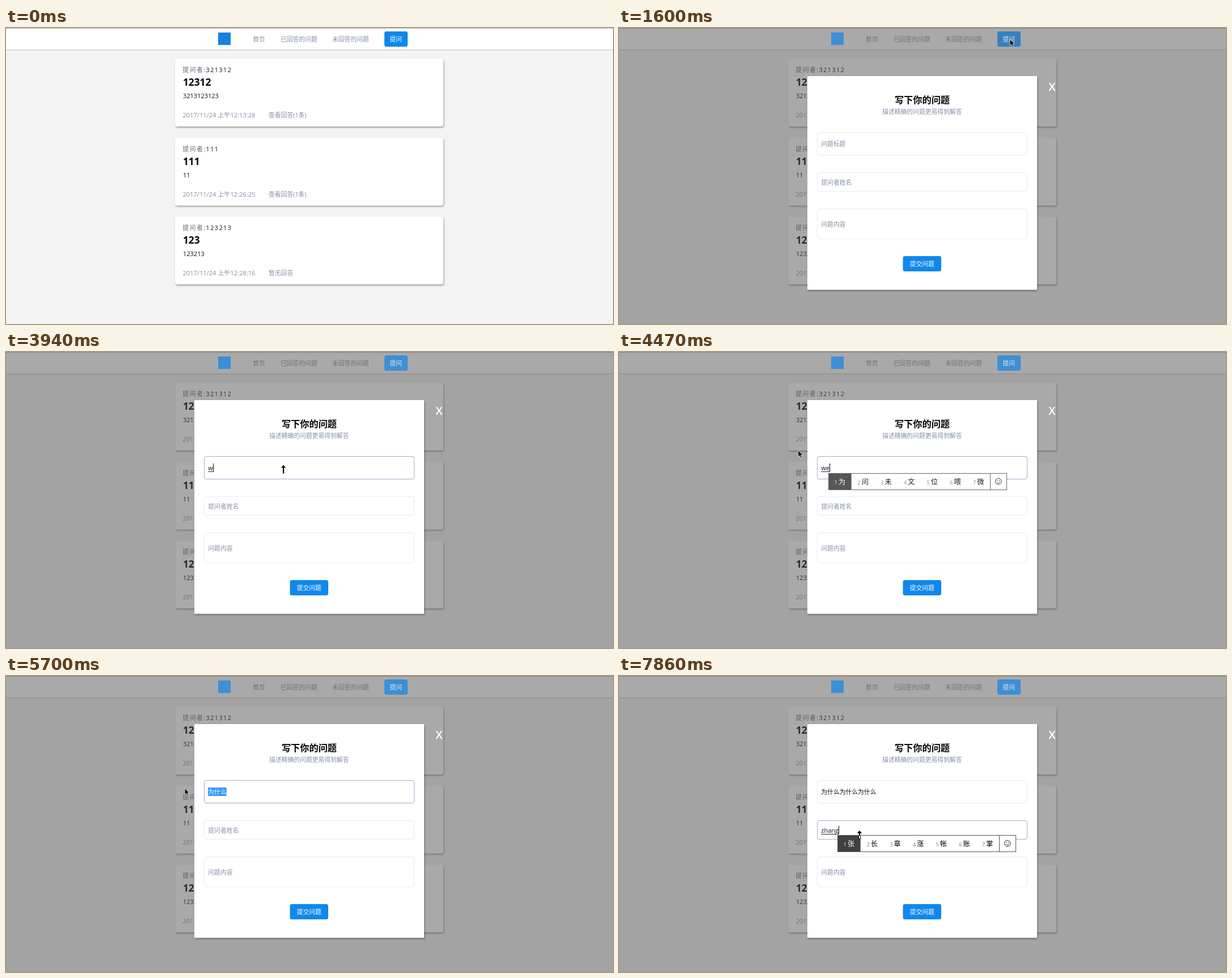
These frames come from a looping animation (1070x523 px, 8 s). An HTML page:

```html
<!DOCTYPE html>
<html lang="zh-CN">
<head>
<meta charset="utf-8">
<title>提问</title>
<style>
  html, body { margin: 0; width: 100%; height: 100%; overflow: hidden; background: #f3f3f3; }
  svg { display: block; width: 1070px; height: 523px; }
  text { font-family: "Open Sans", "Noto Sans CJK SC", "Noto Sans CJK", sans-serif; white-space: pre; }
</style>
</head>
<body>
<svg id="stage" viewBox="0 0 1070 523" xmlns="http://www.w3.org/2000/svg"></svg>
<script>
const LOOP = 8000;
const GREY = '#8590a6';
const BLUE = '#0f88eb';

// Screen refreshes: [first, last, count]; the picture rests in between.
const BURSTS = [
  [130, 360, 4], [510, 1200, 10], [1600, 2290, 10], [2440, 2440, 1], [2610, 2610, 1],
  [2840, 2840, 1], [3390, 3460, 2], [3940, 4700, 11], [4780, 5320, 8], [5470, 6090, 9],
  [6320, 7080, 11], [7160, 7400, 4], [7630, 7630, 1], [7860, 7860, 1]
];

// Pointer path: [time, x, y]
const PATH = [
  [130, 980, 472], [360, 673, 211], [510, 680, 180], [820, 718, 100], [1200, 689, 18],
  [1600, 689, 20], [1680, 687, 30], [2290, 513, 209], [3900, 513, 209], [4320, 262, 190],
  [4470, 315, 174], [4700, 420, 183], [4780, 424, 179], [5320, 428, 207], [5470, 410, 206],
  [5625, 335, 201], [5700, 316, 198.5], [5780, 288, 200], [6090, 424, 209],
  [6320, 424, 209], [6850, 424, 280.5]
];

const WHY = '为什么';
const TITLE_TEXT = [
  [0, ''], [3460, 'w'], [4470, 'we'], [4545, 'wei'], [4695, 'weis'], [4780, 'weish'],
  [4930, 'weishe'], [5010, 'weishen'], [5085, 'weishenm'], [5160, 'weishenme'],
  [5320, WHY], [6010, WHY.repeat(2)], [6320, WHY.repeat(3)]
];
const NAME_TEXT = [[0, ''], [7160, 'z'], [7318, 'zh'], [7400, 'zha'], [7630, 'zhan'], [7860, 'zhang']];

const PHRASES = '为什么 为什么呢 为什么要 为神么 为 未 位';
const CANDIDATES = {
  w: '我 为 无 问 完 万 玩',
  we: '为 问 未 文 位 喂 微',
  wei: '为 位 未 喂 微 味 围',
  weis: '卫生 为 位 未 喂 微 味',
  z: '在 中 这 最 做 再 只',
  zh: '中 这 只 之 着 长 张',
  zha: '炸 扎 渣 眨 闸 榨 诈',
  zhan: '站 展 战 占 沾 粘 斩',
  zhang: '张 长 章 涨 帐 账 掌'
};

const stage = document.getElementById('stage');
const pen = document.createElement('canvas').getContext('2d');
const measure = s => {
  pen.font = '11px "Open Sans", "Noto Sans CJK SC", "Noto Sans CJK", sans-serif';
  return /^[a-z]/.test(s) ? pen.measureText(s).width : s.length * 10.8;
};

const rect = (x, y, w, h, fill, extra = '') =>
  `<rect x="${x}" y="${y}" width="${w}" height="${h}" fill="${fill}" ${extra}/>`;
const text = (x, y, s, fill = '#000', size = 10.8, extra = '') =>
  `<text x="${x}" y="${y}" fill="${fill}" font-size="${size}" ${extra}>${s}</text>`;
const latest = (list, t) => list.filter(e => e[0] <= t).pop()[1];
const mix = (a, b, k) => a + (b - a) * k;

function snap(t) {
  const burst = BURSTS.filter(b => b[0] <= t).pop();
  if (!burst) return 0;
  const [start, end, count] = burst;
  if (count === 1) return start;
  const gap = (end - start) / (count - 1);
  return Math.min(end, start + Math.floor((t - start) / gap + 0.1) * gap);
}

function pointerAt(t) {
  const i = PATH.findIndex(p => p[0] > t);
  if (i < 0) return PATH[PATH.length - 1].slice(1);
  const [t0, x0, y0] = PATH[i - 1], [t1, x1, y1] = PATH[i];
  const k = (t - t0) / (t1 - t0);
  return [mix(x0, x1, k), mix(y0, y1, k)];
}

function card(i, asker, title, body, time, answers) {
  const spaced = 'letter-spacing="1.45"';
  return `<g transform="translate(0 ${i * 139.5})">` +
    rect(298, 54.5, 473, 119.5, '#fff', 'rx="4" filter="url(#lift)"') +
    text(311.5, 78, `提问者:<tspan fill="#111">${asker}</tspan>`, '#5c6579', 10.8, spaced) +
    text(312, 102, title, '#000', 17.3, 'font-weight="700"') +
    text(312, 124, body, '#111', 11) +
    text(311.5, 158.3, `2017/11/24 上午${time}`, GREY, 11.1) +
    text(463, 158.3, answers, GREY) + '</g>';
}

const DEFS = `<defs>
  <filter id="lift" x="-5%" y="-10%" width="110%" height="125%">
    <feDropShadow dx="1" dy="2" stdDeviation="1.6" flood-color="#000" flood-opacity=".36"/>
  </filter></defs>`;

const PAGE = rect(0, 0, 1070, 523, '#f3f3f3') +
  rect(0, 0, 1070, 38, '#fff') + rect(0, 0, 1070, 1, '#b4b4b4') +
  rect(0, 38, 1070, 1, '#c9c9c9') + rect(0, 39, 1070, 1, '#ebebeb') +
  text(435, 23.6, '首页', GREY) + text(484, 23.6, '已回答的问题', GREY) +
  text(575, 23.6, '未回答的问题', GREY) +
  card(0, '321312', '12312', '3213123123', '12:13:28', '查看回答(1条)') +
  card(1, '111', '111', '11', '12:26:25', '查看回答(1条)') +
  card(2, '123213', '123', '123213', '12:28:16', '暂无回答');

const DIALOG = rect(332, 85, 405, 377.5, '#fff', 'filter="url(#lift)"') +
  text(534.5, 132.5, '写下你的问题', '#000', 16.2, 'font-weight="700" text-anchor="middle"') +
  text(534.3, 151.8, '描述精确的问题更易得到解答', GREY, 10.8, 'text-anchor="middle"') +
  rect(500.5, 403, 67.5, 27, BLUE, 'rx="3.5"') +
  text(534.3, 420.6, '提交问题', '#fff', 10.8, 'text-anchor="middle"') +
  text(763.5, 111, 'X', '#fff', 20, 'font-weight="600" text-anchor="middle"');

function navControls(hover, dim) {
  const fill = dim ? mixBlue(hover) : hover ? '#0d78d4' : BLUE;
  return rect(374, 8, 22, 22, dim ? '#3d8fd6' : '#1583dd') +
    rect(667, 6, 41, 27, fill, 'rx="3.5"') +
    text(676.5, 23.6, '提问', dim ? '#e2e6ea' : '#fff');
}
const mixBlue = hover => hover ? '#3580bf' : '#3d8fd6';

// A form field; focus runs 0..1, selectFrom is the left end of a selection.
function field({ y, h, base, hint, value = '', focus = 0, caret = false, selectFrom = null }) {
  const border = `rgb(${mix(235, 159, focus)},${mix(235, 176, focus)},${mix(235, 203, focus)})`;
  const typing = /^[a-z]/.test(value);
  const end = 356.3 + measure(value);
  let out = rect(349.5, y + 0.5, 370, h, '#fff', `rx="3.5" stroke="${border}"`);
  out += value ? text(356.3, base, value, '#111', typing ? 11 : 10.8) : text(356.3, base, hint, GREY);
  if (selectFrom !== null) {
    out += rect(selectFrom, base - 12, end - selectFrom, 15, '#3399ff') +
      text(356.3, base, value, '#fff');
  }
  if (typing) out += rect(356.5, Math.round(base + 2), end - 356.5, 1, '#222');
  if (caret) out += rect(Math.round(end - 0.2), base - 12, 1, 15, '#000');
  return out;
}

function candidateBar(value, base, opacity) {
  if (!/^[a-z]/.test(value) || !opacity) return '';
  const words = (CANDIDATES[value] || PHRASES).split(' ');
  const left = Math.round(356.3 + measure(value) - 2), top = Math.round(base + 4.6);
  let x = left, cells = '';
  words.forEach((word, i) => {
    const width = 28.5 + 12.2 * word.length;
    if (!i) cells += rect(x, top, width, 29, '#404040');
    cells += text(x + 11, top + 19.5, i + 1, i ? '#777' : '#fff', 8.6) +
      text(x + 18, top + 19.6, word, i ? '#000' : '#fff', 12.2);
    x += width;
  });
  const face = `<g transform="translate(${x + 14.8} ${top + 14.7})" fill="none" stroke="#222">
    <circle r="5.4"/><path d="M-3 1.2Q0 4.8 3 1.2"/><path d="M-2-2.2v1.6M2-2.2v1.6" stroke-width="1.3"/></g>`;
  return `<g opacity="${opacity}">` + rect(left, top, x + 30 - left, 29, '#fff') + cells +
    `<path d="M${Math.round(x)}.5 ${top}v29" stroke="#555"/>` + face +
    rect(left + 0.5, top + 0.5, Math.round(x + 29 - left), 29, 'none', 'stroke="#555"') + '</g>';
}

const ARROW = '<path d="M0 0V11.2L2.6 8.8L4.5 13L6.4 12.2L4.6 8.1H8.2Z" fill="#000" stroke="#fff" stroke-width=".7"/>';
const HAND = `<path d="M0 1.2Q0-.2 1.2-.2T2.4 1.2V6.2L7 7.2Q8.3 7.6 8.2 9L7.4 14.2V17.5H.8V15
  L-2.8 10.4Q-3.4 9.2-2.4 8.8T0 10.4Z" fill="#fff" stroke="#111"/>`;
const BEAM = `<path d="M0-7.5L4.2-2.7H1.1V7.5H-1.1V-2.7H-4.2Z" fill="#000"/>`;
const BEAM_TAIL = '<path d="M-1.5 1H1.5V7H-1.5Z" fill="#fff" stroke="#000"/>';

function pointer(t, dialog, [x, y], overBar) {
  if (t < 130) return '';
  const within = (x0, y0, x1, y1) => x > x0 && x < x1 && y > y0 && y < y1;
  const inField = dialog && (within(349, 184, 720, 225) || within(349, 255, 720, 289));
  const shape = inField ? BEAM + (overBar ? BEAM_TAIL : '')
    : !dialog && within(667, 6, 708, 33) ? HAND : ARROW;
  return `<g transform="translate(${x} ${y})">${shape}</g>`;
}

function draw(t) {
  const dialog = t >= 1600;
  const spot = t < 130 ? [0, 0] : pointerAt(t);
  const hover = spot[0] > 667 && spot[0] < 708 && spot[1] > 6 && spot[1] < 33;
  let out = DEFS + PAGE;
  if (dialog) out += rect(0, 0, 1070, 523, '#545454', 'opacity=".5"');
  out += navControls(hover, dialog);

  let overBar = false;
  if (dialog) {
    const title = latest(TITLE_TEXT, t), name = latest(NAME_TEXT, t);
    const selecting = t >= 5540 && t < 5850;
    const onName = t >= 6920;
    const ease = t < 2440 ? 0 : t < 2610 ? 0.5 : 1;
    const swap = t < 6920 ? 0 : t < 7000 ? 0.5 : 1;
    const blinkOn = t >= 2440 && (t < 2840 || t >= 3390);
    const barOpacity = t < 4390 ? 0 : t < 4460 ? 0.5 : t < 4540 ? 0.88 : 1;
    overBar = name !== '';
    out += DIALOG +
      field({
        y: 184, h: 40, base: 209, hint: '问题标题', value: title, focus: ease - swap,
        caret: blinkOn && !selecting && !onName,
        selectFrom: selecting ? Math.min(388, Math.max(356, spot[0])) : null
      }) +
      field({ y: 255, h: 33, base: 276.5, hint: '提问者姓名', value: name, focus: swap, caret: onName }) +
      field({ y: 319, h: 53, base: 350.5, hint: '问题内容' }) +
      candidateBar(title, 209, barOpacity) + candidateBar(name, 276.5, 1);
  }
  stage.innerHTML = out + pointer(t, dialog, spot, overBar);
}

let shown = -1;
const began = performance.now();
function tick() {
  const t = snap((performance.now() - began) % LOOP);
  if (t !== shown) draw(shown = t);
  requestAnimationFrame(tick);
}
tick();
</script>
</body>
</html>
```
